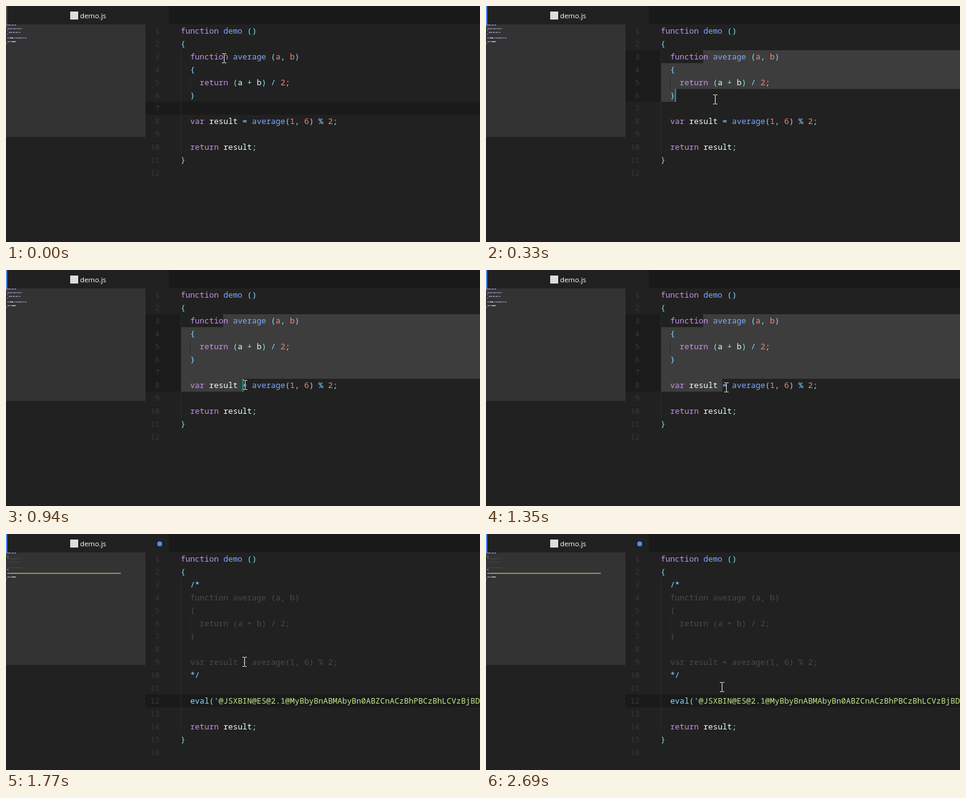
An HTML page that plays this animation: 768x384 px, repeating every 2.84 s.

```html
<!DOCTYPE html>
<html lang="en">
<head>
<meta charset="utf-8">
<title>demo.js</title>
<style>
  html, body { margin: 0; width: 100%; height: 100%; overflow: hidden; background: #212121; }
  svg { display: block; width: 768px; height: 384px; overflow: hidden; }
  rect, path { shape-rendering: crispEdges; }
  .code text { font: 12.83px "Noto Sans Mono", monospace; white-space: pre; }
  .code .num { fill: #383838; text-anchor: end; }
  .tab { font: 11.4px "Open Sans", sans-serif; fill: #fff; }
</style>
</head>
<body>
<svg id="stage" viewBox="0 0 768 384"></svg>
<script>
const LOOP = 2840, LEFT = 283, TOP = 30, ROW = 21, COL = 7.698;
const PRESS = 50, RELEASE = 600, CONVERT = 1400, DOT = 1650;
const COLORS = {
  keyword: '#c792ea', name: '#82aaff', punct: '#89ddff', value: '#f78c6c',
  string: '#c3e88d', plain: '#eeffff', comment: '#4a4a4a'
};

const before = [
  'function demo ()',
  '{',
  '  function average (a, b)',
  '  {',
  '    return (a + b) / 2;',
  '  }',
  '',
  '  var result = average(1, 6) % 2;',
  '',
  '  return result;',
  '}',
  ''
];
const payload = '@JSXBIN@ES@2.1@MyBbyBnABMAbyBn0ABZCnACzBhPBCzBhLCVzBjBD';
const after = [
  ...before.slice(0, 2), '  /*', ...before.slice(2, 8), '  */', '',
  "  eval('" + payload, '', ...before.slice(9)
];

// Pointer path: time, x, y
const path = [
  [0, 353, 85], [90, 353, 86], [200, 362, 117], [330, 371, 152], [470, 381, 178],
  [560, 383, 180], [700, 385, 183], [1120, 389, 190], [1350, 389, 191], [1680, 390, 198],
  [1770, 386, 208], [2000, 383, 227], [2230, 382, 241], [2460, 382, 248],
  [2640, 382, 248], [2690, 382, 249], [LOOP, 382, 249]
];

const stage = document.getElementById('stage');

function add(parent, tag, attrs = {}, text = '') {
  const el = document.createElementNS('http://www.w3.org/2000/svg', tag);
  set(el, attrs);
  el.textContent = text;
  parent.appendChild(el);
  return el;
}

function set(el, attrs) {
  for (const key in attrs) el.setAttribute(key, attrs[key]);
}

function rect(parent, x, y, width, height, fill) {
  return add(parent, 'rect', { x, y, width, height, fill });
}

function show(el, on) {
  el.setAttribute('visibility', on ? 'visible' : 'hidden');
}

function kindOf(word, line) {
  if (word.startsWith('@')) return 'string';
  if (/^(function|var|return)$/.test(word)) return 'keyword';
  if (/^(demo|average)$/.test(word)) return 'name';
  if (/^\d/.test(word)) return 'value';
  if (/^[ab]$/.test(word) && line.includes('function')) return 'value';
  if (word === 'eval' || /^\W/.test(word)) return 'punct';
  return 'plain';
}

function tokens(line, commented) {
  const words = line.match(/@.*|\w+|\s+|[^\w\s]/g) || [];
  return words.map(word => [word, commented ? 'comment' : kindOf(word, line)]);
}

function buildPage(lines, inComment) {
  const page = add(stage, 'g', { class: 'code' });
  const map = add(page, 'g', { opacity: 0.55 });
  lines.forEach((line, i) => {
    const y = TOP + i * ROW + 15;
    add(page, 'text', { class: 'num', x: 249, y }, String(i + 1));
    const row = add(page, 'text', { x: LEFT, y });
    let col = 0;
    for (const [word, kind] of tokens(line, inComment(i))) {
      const fill = COLORS[kind];
      add(row, 'tspan', { fill }, word);
      if (word.trim()) {
        rect(map, col, TOP + i * 3, kind === 'string' ? 186 - col : word.length, 2, fill);
      }
      col += word.length;
    }
  });
  return page;
}

function buildGuides(last, inner) {
  const g = add(stage, 'g');
  rect(g, LEFT, TOP + 2 * ROW, 1, (last - 1) * ROW, '#2b2b2b');
  rect(g, 298, TOP + inner * ROW, 1, ROW, '#2b2b2b');
  return g;
}

// Backdrop
rect(stage, 0, 0, 768, 384, '#212121');
rect(stage, 264, 0, 504, 30, '#191919');
rect(stage, 0, 30, 226, 183, '#333333');
const accent = rect(stage, 0, 0, 2, 30, '#555555');
rect(stage, 104, 9, 13, 13, '#dddddd');
add(stage, 'text', { class: 'tab', x: 120, y: 20 }, 'demo.js');
const dot = add(stage, 'circle', { cx: 249, cy: 16, fill: '#528bff' });

// Editor layers
const current = rect(stage, 226, 0, 542, ROW, '#1a1a1a');
const gutter = rect(stage, 226, 0, 57, ROW, '#1b1b1b');
const selection = add(stage, 'path', { fill: '#3d3d3d' });
const guides = [buildGuides(9, 4), buildGuides(13, 5)];
const pages = [
  buildPage(before, () => false),
  buildPage(after, i => i > 2 && i < 9)
];
const caret = rect(stage, 0, 0, 2, ROW, '#0f9d8a');
const pointer = add(stage, 'path', {
  d: 'M-3-8h3v1h-3zM1-8h3v1h-3zM0-7h1v14h-1zM-3 7h3v1h-3zM1 7h3v1h-3z',
  fill: '#f4f4f4', stroke: '#212121', 'stroke-width': 1, 'paint-order': 'stroke'
});

function pointerAt(t) {
  const i = Math.max(1, path.findIndex(p => p[0] >= t));
  const [t0, x0, y0] = path[i - 1], [t1, x1, y1] = path[i];
  const k = Math.max(0, (t - t0) / (t1 - t0));
  return [Math.round(x0 + (x1 - x0) * k), Math.round(y0 + (y1 - y0) * k)];
}

// The text position trails the pointer slightly while dragging.
function caretAt(t) {
  if (t < PRESS) return [6, 0];
  if (t >= CONVERT) return [11, 0];
  const [x, y] = pointerAt(Math.min(t, RELEASE) - 40);
  const row = Math.floor((y - TOP) / ROW);
  return [row, Math.min(before[row].length, Math.round((x - LEFT) / COL))];
}

function caretOn(t) {
  if (t < CONVERT) return t >= PRESS && t < 1000;
  return t < 1600 || (t >= 2000 && t < 2400);
}

function selectionPath(row, x) {
  const y = TOP + 2 * ROW, start = LEFT + 9 * COL;
  if (row === 2) return `M${start} ${y}H${x}v${ROW}H${start}z`;
  const end = TOP + row * ROW;
  return `M${start} ${y}H768V${end}H${x}v${ROW}H${LEFT}V${y + ROW}H${start}z`;
}

function draw(t) {
  const done = t >= CONVERT;
  const [row, col] = caretAt(t);
  const x = LEFT + col * COL, y = TOP + row * ROW;
  const selected = t >= PRESS && !done && (row > 2 || col !== 9);

  [pages, guides].forEach(([a, b]) => { show(a, !done); show(b, done); });
  set(accent, { fill: t < PRESS ? '#555555' : '#528bff' });
  set(dot, { r: 4 * Math.min(1, Math.max(0, (t - DOT) / 90)) });

  show(current, !selected);
  set(current, { y });
  show(gutter, selected);
  set(gutter, { y: TOP + 2 * ROW, height: Math.max(1, row - 1) * ROW });
  show(selection, selected);
  if (selected) set(selection, { d: selectionPath(row, x) });

  show(caret, caretOn(t));
  set(caret, { x: Math.round(x), y });
  set(pointer, { transform: `translate(${pointerAt(t)})` });
}

const start = performance.now();
function tick() {
  draw((performance.now() - start) % LOOP);
  requestAnimationFrame(tick);
}
tick();
</script>
</body>
</html>
```
